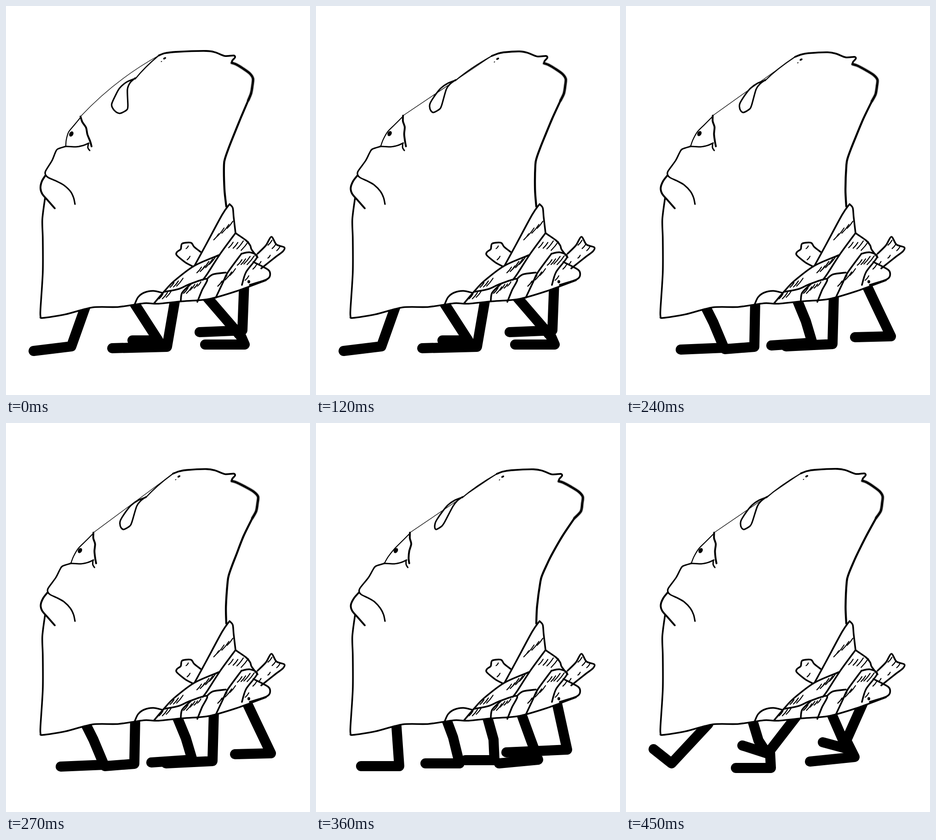
These frames come from a looping animation (661 px wide and 848 px high, 480 ms). An HTML page:

```html
<!DOCTYPE html>
<html lang="en">
<head>
<meta charset="utf-8">
<title>Walking head</title>
<style>
html, body { margin: 0; width: 100%; height: 100%; overflow: hidden; background: #fff; }
svg { display: block; width: 661px; height: 848px; }
path { fill: none; stroke: #000; stroke-linecap: round; stroke-linejoin: round; }
</style>
</head>
<body>
<svg viewBox="0 0 661 848">
  <g id="legs"></g>
  <g id="body"></g>
  <g id="head"></g>
</svg>
<script>
const STEP = 30, COUNT = 16;

function add(parent, tag, attrs) {
  const el = document.createElementNS('http://www.w3.org/2000/svg', tag);
  for (const k in attrs) el.setAttribute(k, attrs[k]);
  return document.getElementById(parent).appendChild(el);
}

const points = text => text.trim().split(/\s+/).map(p => p.split(',').map(Number));
const mix = (a, b, u) => a + (b - a) * u;
const clamp = v => Math.max(0, Math.min(1, v));

// Linear interpolation through [position, value] pairs
function ramp(x, stops) {
  if (x <= stops[0][0]) return stops[0][1];
  for (let i = 1; i < stops.length; i++) {
    const [a, va] = stops[i - 1], [b, vb] = stops[i];
    if (x <= b) return mix(va, vb, (x - a) / (b - a));
  }
  return stops[stops.length - 1][1];
}

// Smooth curve through all points
function curve(p) {
  const at = i => p[Math.max(0, Math.min(p.length - 1, i))];
  let d = 'M' + p[0];
  for (let i = 1; i < p.length; i++) {
    const h = at(i - 1).map((v, j) => v + (at(i)[j] - at(i - 2)[j]) / 7);
    const g = at(i).map((v, j) => v - (at(i + 1)[j] - at(i - 1)[j]) / 7);
    d += `C${h} ${g} ${at(i)}`;
  }
  return d;
}

// ---- legs: hip, knee, heel, toe
const POSES = {
  A: ['176,646 142,742 60,752', '275,642 331,729 275,729', '368,638 350,743 231,746',
    '438,636 512,722 519,738 433,738', '518,602 514,707 421,711'],
  B: ['174,648 181,748 98,748', '282,642 298,685 312,742 238,742',
    '371,636 386,690 388,735 325,735', '445,630 466,688 483,734 398,742',
    '522,602 546,712 414,718'],
  C: ['169,648 190,690 213,745 119,749', '281,642 279,743 215,748',
    '370,636 391,687 405,734 316,740', '452,628 449,737 348,742',
    '520,602 545,655 576,720 498,722'],
  D: ['179,656 99,742 60,711', '273,642 288,692 306,720 253,703',
    '370,640 313,714 315,752 239,752', '446,632 480,710 428,696',
    '519,602 479,692 497,728 400,738']
};
const GAIT = 'ABCDAABBCCDABCCD';
const poses = {};
for (const k in POSES) {
  const d = POSES[k].map(s => 'M' + s.replace(/ /g, 'L')).join('');
  poses[k] = add('legs', 'path', { d, 'stroke-width': 22 });
}

// ---- body and leaf skirt
const ink = (text, fill = 'none') =>
  add('body', 'path', { d: curve(points(text)), 'stroke-width': 3.6, style: 'fill:' + fill });

ink(`85,418 79,465 80,508 80,580 75,660 75,676 80,680 130,672 188,657 245,656
  300,648 330,649 380,644 440,639 500,622 565,598`, '#fff');

const SPIKE = ['486,432 493,440 495,460 499,494', '486,432 470,455 435,520 410,566'];
const LEAVES = [
  '499,495 522,511 531,522 534,531 547,548', '499,495 466,540 437,585 428,597',
  '463,543 410,566 365,600 345,621 322,648', '512,540 530,537 546,547 522,580 513,608',
  '512,540 482,581 472,602 456,636'
];
const HEM = [
  '345,623 375,617 400,606 437,595 426,620 416,645', '437,595 450,585 478,581',
  '402,606 383,625 380,643', '280,650 287,635 300,625 320,621 339,625'
];
const TIPS = [
  '407,568 390,559 371,543 372,536 380,530 383,518 402,516 409,525 423,536',
  '538,558 570,575 574,588 565,597 530,608',
  '547,540 565,522 577,503 588,520 605,526 602,535 585,548 555,572'
];
[...SPIKE, ...LEAVES, ...HEM, ...TIPS].forEach(s => ink(s));

// Grain: from, to, number of marks, length
function hatch(x, y, x2, y2, n, size) {
  for (let i = 0; i < n; i++) {
    const u = i / (n - 1), s = size * (.4 + .1 * Math.sin(i * 5 + x));
    const cx = mix(x, x2, u), cy = mix(y, y2, u) + 3 * Math.sin(i * 3);
    const d = `M${cx + s * .65} ${cy - s * .8}Q${cx + 1} ${cy + 1} ${cx - s * .65} ${cy + s * .8}`;
    add('body', 'path', { d, 'stroke-width': 2.2 });
  }
}
[
  [487, 477, 457, 502, 4, 24], [489, 521, 519, 522, 4, 24], [449, 555, 420, 577, 5, 24],
  [378, 602, 361, 609, 3, 22], [508, 559, 532, 553, 4, 24], [493, 580, 465, 604, 4, 22],
  [420, 606, 391, 622, 5, 18], [354, 628, 337, 634, 3, 18], [574, 516, 592, 530, 3, 14],
  [552, 560, 572, 546, 2, 12], [394, 526, 397, 549, 2, 12], [524, 593, 541, 568, 2, 13]
].forEach(a => hatch(...a));
add('body', 'ellipse', { cx: 528, cy: 601, rx: 3, ry: 3.5 });

// ---- head: how far each region is pushed at the key steps
const KEYS = [0, 2, 4, 6, 9, 12, 15, 16];
const PUSH = {
  face: [0, 1, 1, .85, 1.04, 1.75, 1.12, 0],
  crown: [0, 50, 50, 45, 31, 61, 48, 0],
  crest: [0, 27, 5, 5, 0, 37, 23, 0],
  back: [0, 34, 6, 7, 11, 43, 21, 0],
  neck: [0, 4, 3, 0, 8, 14, 6, 0],
  bob: [0, -4, 1, 3.5, 2.5, 3, 2, 0]
};

// Top and back of the head
function skull([x, y], p) {
  const lift = p.bob * clamp((345 - y) / 200);
  const dx = x < 480 && y < 125
    ? ramp(x, [[345, p.crown], [440, p.crest]])
    : ramp(y, [[124, p.crest], [155, p.back], [190, p.back], [205, p.back * .82],
        [245, p.back * .6], [287, p.back * .25 + p.neck * .6], [345, p.neck], [437, 0]]);
  return [x + dx, y + lift];
}

// Front of the head: the outline moves most
function front([x, y], p) {
  const edge = y < 242 ? 162 + (242 - y) * 1.19 : 162 - (y - 242) * .5;
  const slope = ramp(y, [[235, .25], [255, .12], [300, .06], [310, 0]]);
  const reach = ramp(y, [[242, 27], [275, 19], [305, 11], [337, 8], [365, 5], [400, 0]]);
  const dx = Math.max(0, reach - slope * (x - edge));
  const drop = ramp(y, [[158, 4], [190, -2], [240, -2], [310, 0]]);
  const over = Math.max(p.face - 1, 0);
  return [x + dx * (p.face - over) + Math.min(dx, 20) * over, y + drop * (p.face - over)];
}

const PARTS = [
  [skull, 3.8, '332,108 345,103 370,100 435,98 455,101 476,109 495,108 498,112 492,119 491,124'],
  [skull, 5, '491,124 500,127 515,136 530,147 537,158 536,172 533,190 527,205'],
  [skull, 4.4, '527,205 510,245 493,287 484,310 477,330 474,346 475,400 479,437'],
  [front, 3.2, `281,158 262,166 247,179 238,195 230,213 231,221 238,230 248,234 262,227
    265,218 264,182 270,167 281,157`],
  [front, 4, '162,241 166,253 174,265 177,280 183,295 186,306'],
  [front, 2.2, '162,243 148,260 136,275 131,292 130,305'],
  [front, 3, '130,306 152,307 168,304 180,299'],
  [front, 3, '179,301 178,309 182,315'],
  [front, 3.2, `130,306 112,312 107,320 100,337 86,360 86,368 92,374 110,382 125,390
    140,404 147,418 150,432`],
  [front, 4, '86,369 78,382 75,397 79,410 92,425 106,441']
].map(([move, width, text]) => ({
  move, pts: points(text), el: add('head', 'path', { 'stroke-width': width })
}));

// Soft fringe behind the jagged bend
const fringe = add('head', 'path', { 'stroke-width': 8, 'stroke-opacity': .22 });
const brow = add('head', 'path', { 'stroke-width': 1.3 });
const crease = add('head', 'path', { 'stroke-width': 2.3 });

const DOTS = [
  [front, [142, 279], 4.3, 6, 30],
  [skull, [345, 114], 3.4, 2, -30],
  [skull, [338, 121], 1.5, 1, -30]
].map(([move, at, rx, ry, turn]) => ({ move, at, turn, el: add('head', 'ellipse', { rx, ry }) }));

function draw(time) {
  const f = Math.floor(time / STEP) % COUNT;
  for (const k in poses)
    poses[k].setAttribute('visibility', k === GAIT[f] ? 'visible' : 'hidden');

  const p = {};
  for (const k in PUSH) p[k] = ramp(f, KEYS.map((t, i) => [t, PUSH[k][i]]));

  for (const s of PARTS) s.el.setAttribute('d', curve(s.pts.map(q => s.move(q, p))));
  fringe.setAttribute('d', PARTS[1].el.getAttribute('d'));

  const top = skull([332, 108], p), low = front([162, 241], p), fold = front([281, 159], p);
  const bulge = 17 * (1 - Math.min(p.face, 1));
  const mid = [(top[0] + low[0]) / 2 - bulge * .6, (top[1] + low[1]) / 2 - bulge * .8];
  brow.setAttribute('d', `M${top}Q${mid} ${low}`);
  crease.setAttribute('d', `M${top}Q${mix(top[0], fold[0], .6)} ${mix(top[1], fold[1], .5)} ${fold}`);

  for (const d of DOTS) {
    const [x, y] = d.move(d.at, p);
    d.el.setAttribute('transform', `translate(${x} ${y}) rotate(${d.turn})`);
  }
}

const start = performance.now();
function tick(now) {
  draw(Math.max(0, now - start));
  requestAnimationFrame(tick);
}
draw(0);
requestAnimationFrame(tick);
</script>
</body>
</html>
```
